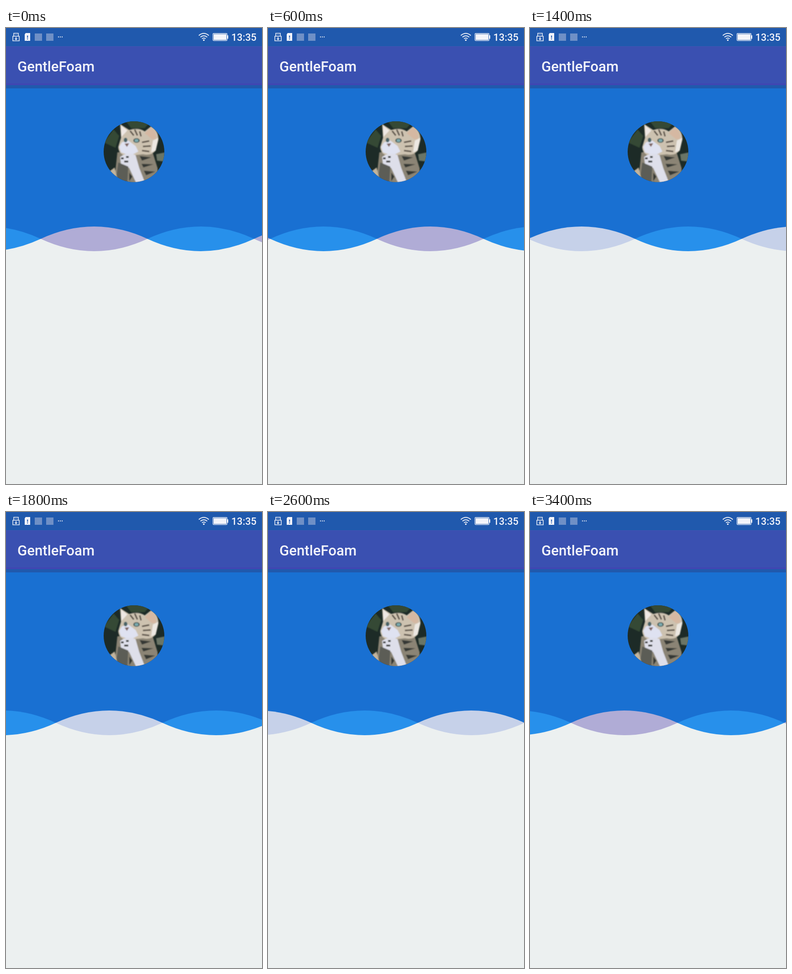
Recreate the animation shown at these times as an HTML page. Size 561x997 px, loop 3.6 s.

```html
<!DOCTYPE html>
<html lang="en">
<head>
<meta charset="utf-8">
<title>Wave header</title>
<style>
html, body { margin: 0; width: 100%; height: 100%; overflow: hidden; background: #ecf0f0; }
svg { display: block; }
text { font-family: Roboto, sans-serif; font-weight: 500; fill: #f3f4fa; }
</style>
</head>
<body>
<svg width="561" height="997" viewBox="0 0 561 997">
  <defs>
    <clipPath id="round"><circle cx="280.5" cy="270.5" r="66.5"/></clipPath>
    <filter id="soft"><feGaussianBlur stdDeviation="0.9"/></filter>
  </defs>

  <rect width="561" height="997" fill="#ecf0f0"/>
  <rect y="132" width="561" height="329" fill="#1970d2"/>
  <g id="waves"></g>

  <!-- App bar and its shadow -->
  <rect width="561" height="132" fill="#2059ad"/>
  <rect y="40" width="561" height="85" fill="#3a50b1"/>
  <rect y="40" width="561" height="1" fill="#4453b4"/>
  <rect y="121" width="561" height="4" fill="#4046b2"/>
  <text x="25" y="95" font-size="31.2">GentleFoam</text>

  <!-- Status bar -->
  <g fill="none" stroke="#e6ebf5" stroke-width="1.6">
    <path d="M17 18V11.5H27V18M15 18H29V28H15ZM22 19.5V25M19.5 23L22 25.5L24.5 23M20 14.5H21M23 14.5H24"/>
    <path d="M422.500 16.500Q433.500 7 444.500 16.500M426 20Q433.500 14 441 20M429.500 23.500Q433.500 20.500 437.500 23.500" stroke-width="2"/>
    <rect x="453.500" y="12" width="31" height="15.500" rx="1.500" stroke-width="1.300"/>
  </g>
  <g fill="#f3f4fa">
    <path d="M43 11H53V28H41V14Z"/>
    <path d="M46.200 16.500H48.200V21.500H46.200ZM46.200 23H48.200V25H46.200Z" fill="#2059ad"/>
    <rect x="455" y="13.500" width="28" height="12.500"/>
    <rect x="485" y="16" width="2" height="7.500"/>
    <circle cx="433.500" cy="26.500" r="1.800"/>
    <path d="M114 18.500h2v2h-2zm4 0h2v2h-2zm4 0h2v2h-2z"/>
    <text x="549" y="28" font-size="21.800" text-anchor="end">13:35</text>
  </g>
  <g fill="#6f90c6">
    <rect x="63" y="12" width="16" height="16"/>
    <rect x="88" y="12" width="16" height="16"/>
  </g>

  <!-- Kitten portrait in flat shapes -->
  <g clip-path="url(#round)">
    <rect x="213" y="203" width="135" height="135" fill="#1d2b27"/>
    <g filter="url(#soft)">
      <path d="M262 203H318L304 219H274ZM214 250L236 222L248 236L240 262Z" fill="#344a35"/>
      <path d="M329 276L348 272V292L331 290Z" fill="#6a7566"/>
      <path d="M226 340L240 310L244 272L296 264L322 274L332 306L334 340Z" fill="#8b8474"/>
      <path d="M250 210L270 223Q290 217 304 226L318 215Q334 224 334 244L328 268Q318 280 300 276L262 280Q246 274 246 260L252 240Z" fill="#cdc2b0"/>
      <path d="M304 230L318 217Q332 228 328 243L320 243Z" fill="#d5b8a2"/>
      <path d="M322 246L334 240L328 268L318 272Z" fill="#ece8e2"/>
      <path d="M252 213L266 224L253 238Z" fill="#eee8e4"/>
      <path d="M254 250L268 246L284 258L290 270L273 279L252 272L248 260Z" fill="#dfe2f1"/>
      <path d="M272 225L280 235M282 222L288 235M293 226L296 237M298 250L314 247M300 259L317 258M298 268L314 270" fill="none" stroke="#4f473e" stroke-width="3"/>
      <ellipse cx="286" cy="246" rx="7" ry="5" fill="#354442"/>
      <ellipse cx="286" cy="246" rx="4.500" ry="3.500" fill="#79a9ad"/>
      <ellipse cx="262" cy="245" rx="4" ry="5" fill="#486467"/>
      <path d="M260 253L270 252L265 260Z" fill="#7c5f5a"/>
      <path d="M250 282Q266 270 284 278L292 306L303 334L285 338L270 306L252 298Z" fill="#dedfea"/>
      <path d="M246 294L268 303L266 338H240Z" fill="#5c5d57"/>
      <path d="M252 283h6v4h-6zM263 280h6v4h-6zM259 290h9v4h-9zM293 280L318 283L298 290ZM297 297L323 298L301 305ZM302 312L327 314L307 322ZM270 316L277 325L270 335Z" fill="#343935"/>
      <path d="M222 317L238 305L246 338H228Z" fill="#c2b49d"/>
    </g>
  </g>
</svg>
<script>
const LOOP = 3600, STEP = 200, WAVELENGTH = 467.5, MID = 461, HEIGHT = 27;
// Centre of the pale crest over time: [ms, x]
const drift = [[0, 193], [600, 355.5], [1400, 580.7], [1800, 693.5],
               [2600, 912.8], [3000, 1028], [3400, 1141.5]];
const waves = document.getElementById('waves');

function crestAt(t) {
  const i = Math.max(1, drift.findIndex(([time]) => time >= t));
  const [t0, x0] = drift[i - 1], [t1, x1] = drift[i];
  return x0 + (x1 - x0) * (t - t0) / (t1 - t0);
}

// Two opposed waves enclose a row of alternating lenses
const half = WAVELENGTH / 2, q = half / 2;
const lenses = [-2, -1, 0, 1, 2].map(i => {
  const lens = document.createElementNS('http://www.w3.org/2000/svg', 'path');
  lens.setAttribute('d', `M${i * half - q} ${MID}q${q} ${-2 * HEIGHT} ${half} 0q${-q} ${2 * HEIGHT} ${-half} 0Z`);
  lens.setAttribute('fill', '#2790eb');
  waves.append(lens);
  return lens;
});
const pale = lenses.filter((_, i) => i % 2 === 0);

function draw() {
  const t = Math.floor(performance.now() % LOOP / STEP) * STEP;
  waves.setAttribute('transform', `translate(${crestAt(t) % WAVELENGTH} 0)`);
  const tint = t >= 1000 && t < 3200 ? '#c6d1e9' : '#b0acd6';
  pale.forEach(lens => lens.setAttribute('fill', tint));
  requestAnimationFrame(draw);
}
draw();
</script>
</body>
</html>
```
